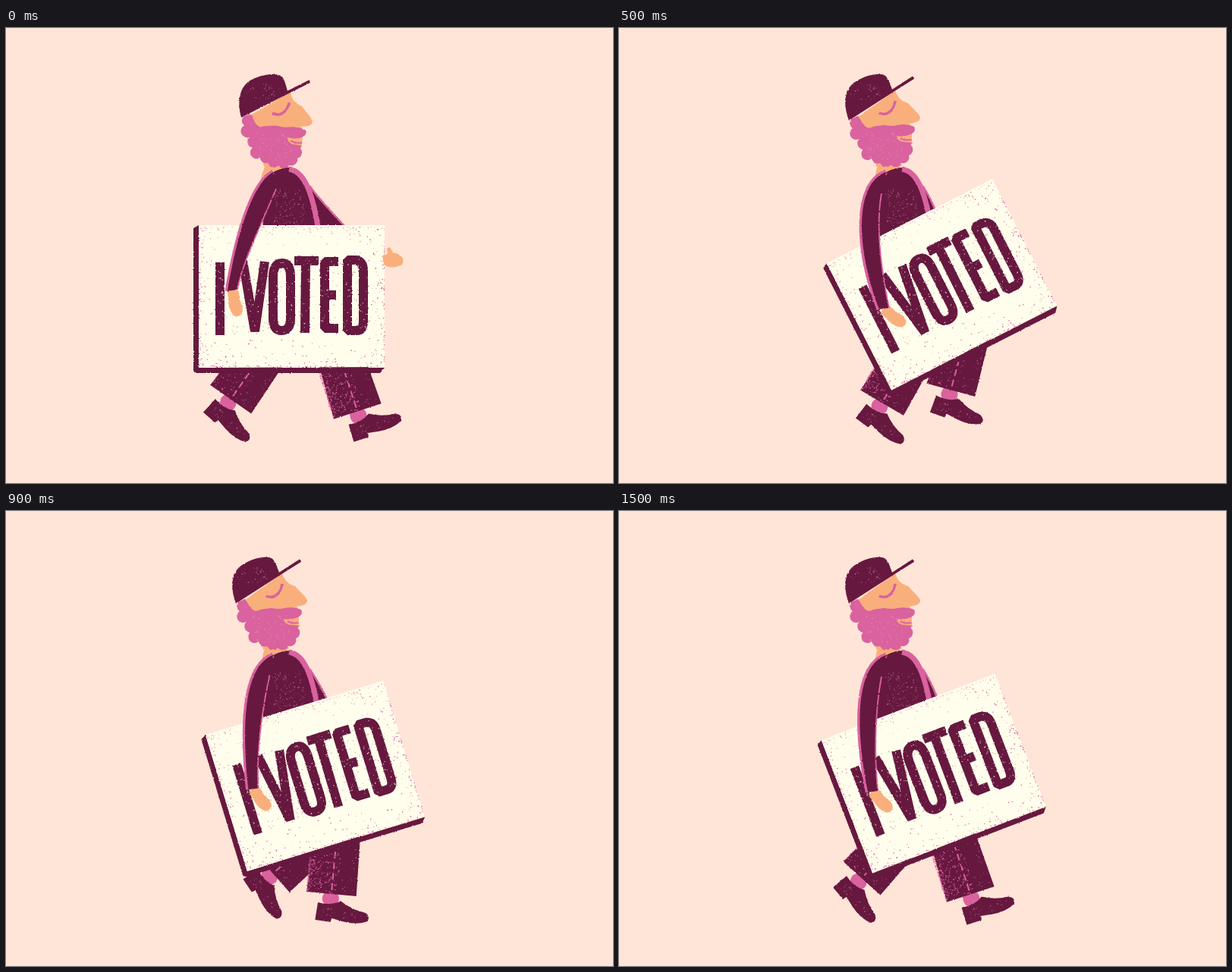
Recreate the animation shown at these times as an HTML page. Size 800 px wide and 600 px high, loop 1.6 s.

```html
<!DOCTYPE html>
<html lang="en">
<head>
<meta charset="utf-8">
<title>I voted</title>
<style>
html, body { margin: 0; width: 100%; height: 100%; overflow: hidden; background: #ffe5d7; }
svg { display: block; width: 100%; height: 100%; }
</style>
</head>
<body>
<svg viewBox="0 0 800 600" role="img" aria-label="Walking man carrying a sign: I VOTED">
  <defs>
    <filter id="rough" filterUnits="userSpaceOnUse" x="0" y="0" width="800" height="600" color-interpolation-filters="sRGB">
      <feTurbulence type="fractalNoise" baseFrequency="0.45" numOctaves="2" seed="4" result="n"/>
      <feDisplacementMap in="SourceGraphic" in2="n" scale="2.2" xChannelSelector="R" yChannelSelector="G"/>
    </filter>
  </defs>
  <g id="man" filter="url(#rough)"></g>
</svg>
<script>
const DARK = '#67183f', PINK = '#d9629f', SKIN = '#f9af7c', CREAM = '#fffeec', DUST = '#a05a7a';
const man = document.getElementById('man');

const fill = (d, c) => `<path d="${d}" fill="${c}"/>`;
const line = (d, c, w, extra = '') => `<path d="${d}" fill="none" stroke="${c}" stroke-width="${w}" ${extra}/>`;
const place = (x, y, r, body) => `<g transform="translate(${x} ${y}) rotate(${r})">${body}</g>`;
const mix = (a, b, k) => a + (b - a) * k;

function random(seed) {
  return () => (seed = seed * 16807 % 2147483647) / 2147483647;
}

// Grain in a box from (x, y); a higher bias gathers it along the starting side.
function grain(x, y, w, h, n, color, biasX = 1, biasY = 1) {
  const rnd = random(7919 + n * 31);
  let d = '';
  for (let i = 0; i < n; i++) {
    const px = x + w * rnd() ** biasX, py = y + h * rnd() ** biasY, s = (0.5 + rnd()).toFixed(1);
    d += `M${px.toFixed(1)} ${py.toFixed(1)}h${s}v${s}h-${s}z`;
  }
  return fill(d, color);
}

const curls = '308 132 317 146 322 160 333 172 344 178 358 180 372 178 382 168 384 154'
  .replace(/(\d+ \d+)/g, 'A8 8 0 0 0 $1');

const head = [
  fill('M335 172L340 184L336 202L362 190L374 180Z', SKIN),
  fill('M310 121L364 82C368 95 375 97 381 99C387 107 396 112 397 119C396 124 388 126 383 125L386 132L386 153L378 165L330 162Z', SKIN),
  fill(`M306 120${curls}L386 151L373 150Q367 148 366 142Q376 144 385 140Q392 136 389 130Q380 126 367 128Q360 130 350 128Q336 129 329 132Q322 129 320 124L315 116Z`, PINK),
  line('M371 146Q378 149 386 147', PINK, 2),
  line('M343 112C354 117 362 108 364 96', PINK, 3.4),
  grain(325, 136, 50, 38, 60, '#e58a9c'),
  fill('M303 122C294 98 298 78 313 70C326 62 344 58 351 63C355 67 357 73 360 81L387 63.5L389 67L362 84Z', DARK),
  grain(304, 74, 44, 20, 40, DUST)
].join('');

const torso =
  fill('M338 200C350 190 362 184 374 184C394 188 404 215 410 262L408 300L340 300L337 215Z', DARK) +
  line('M373 186C392 189 403 213 411 262', PINK, 7) +
  grain(350, 212, 44, 50, 130, DUST);

const letters = [
  'M-90 -47V49',
  'M-60 -49L-44 44L-31 -48',
  'M-20 -28Q-20 -46 -8 -46Q3 -46 3 -28V27Q3 43 -9 43Q-20 43 -20 27Z',
  'M8 -49H40M23 -49L22 46',
  'M66 -48H48V40H66M48 -4H63',
  'M78 -50H89Q99 -48 99 -36V30Q99 43 90 43H78Z'
].join('');

const board =
  fill('M-125 -92L-118 -96V92H127L121 99H-121L-125 96Z', DARK) +
  fill('M-118 -96H127V91L-118 92Z', CREAM) +
  grain(126, -94, -40, 184, 150, PINK, 3) +
  grain(-116, -94, 240, 24, 140, '#e9a0b8', 1, 3) +
  grain(-116, 90, 240, -36, 145, PINK, 1, 3) +
  grain(-117, -94, 20, 184, 80, '#dd86a8', 3) +
  line(letters, DARK, 12, 'stroke-linejoin="bevel"') +
  grain(-97, -52, 202, 100, 420, '#d8b9b5');

const shoe =
  `<circle cy="-3" r="11" fill="${PINK}"/>` +
  fill('M-17 1L-22 24L-2 28L0 23L14 28Q32 34 46 30Q52 24 44 18Q26 13 13 1Q0 7 -17 1Z', DARK) +
  grain(-15, 8, 22, 12, 16, DUST) +
  grain(14, 14, 26, 12, 14, DUST);

const hand = fill('M-7 0Q0 -4 7 0Q9 5 8 12Q13 24 9 31Q2 37 -3 30Q-8 22 -7 12Z', SKIN);
const farHand = fill('M496 300L503 298L502 291Q508 286 509 296Q519 297 523 304Q525 313 517 314Q507 318 498 312Z', SKIN);

// One full cycle of an ankle: x, y and turn of the foot, from heel strike on.
const cycle = [
  [466, 514, -29], [428, 514, -3], [371, 514, 0], [342, 502, 25],
  [314, 491, 38], [345, 484, 45], [402, 477, 35], [435, 486, 8]
];
const tilts = [21, 17, 20, 27];

function leg(phase, upright) {
  const [x, y, turn] = cycle[phase];
  const planted = phase < 4;
  // The first stride is wider behind.
  const back = x < 350 ? upright : 0;
  const foot = turn - 8 * back;
  const trouser =
    fill('M-33 -9H33L31 -90H-29Z', DARK) +
    grain(-33, -10, 40, -70, planted ? 330 : 110, PINK, 3) +
    grain(-30, -10, 60, -70, 50, DUST) +
    line('M0 -14V-80', PINK, 2, 'stroke-dasharray="9 5"');
  return place(x - 23 * back, y + 6 * back, 0,
    place(0, 0, foot, shoe) + place(0, 0, foot * 0.9 + 8, trouser));
}

function farArm(k) {
  const x = mix(448, 419, k), y = mix(263, 246, k);
  return fill(`M398 205Q411 222 ${x} ${y}L${x - 5} ${y + 14}H402Z`, DARK) +
    line(`M400 208Q411 224 ${x} ${y}`, PINK, 2.5);
}

// The arm follows the tilt of the sign; k runs from reaching out to hanging.
function nearArm(tilt, k) {
  const x = 299 + 1.16 * tilt + 0.027 * tilt ** 2, y = mix(347, 371, k);
  const outer = `M352 190C${mix(325, 310, k)} 205 ${mix(305, 312, k)} ${mix(270, 290, k)} ${x - 7} ${y}`;
  const inner = `${x + 6} ${y - 2}C${111 + 0.67 * x} ${mix(310, 320, k)} ${mix(336, 338, k)} 260 ${mix(356, 346, k)} ${mix(212, 218, k)}`;
  return place(x, y, -5 - 1.5 * tilt, hand) +
    line(outer, PINK, 7) +
    fill(`${outer}L${inner}Z`, DARK) +
    line('M' + inner, PINK, 1.8, 'stroke-dasharray="26 1 14 2"');
}

function draw(beat) {
  const step = beat % 4;
  const upright = Math.max(0, 1 - beat / 2);
  const tilt = tilts[step] * (1 - upright);
  const hang = Math.min(1, tilt / 20);
  man.innerHTML =
    leg(step + 4, upright) +
    leg(step, upright) +
    farArm(hang) +
    `<g transform="rotate(${upright ? 5.8 : 0} 345 190)">${head}</g>` +
    torso +
    place(372 + 1.87 * tilt, 356 - tilt ** 3 / 1430, -tilt, board) +
    (tilt ? '' : farHand) +
    nearArm(tilt, hang);
}

const LOOP = 1600, HOLD = 200;
let shown = -1;

function update(now) {
  const beat = Math.floor((now % LOOP + HOLD / 2) / HOLD);
  if (beat !== shown) draw(shown = beat);
}

const begin = performance.now();
function tick() {
  update(performance.now() - begin);
  requestAnimationFrame(tick);
}
tick();
</script>
</body>
</html>
```
